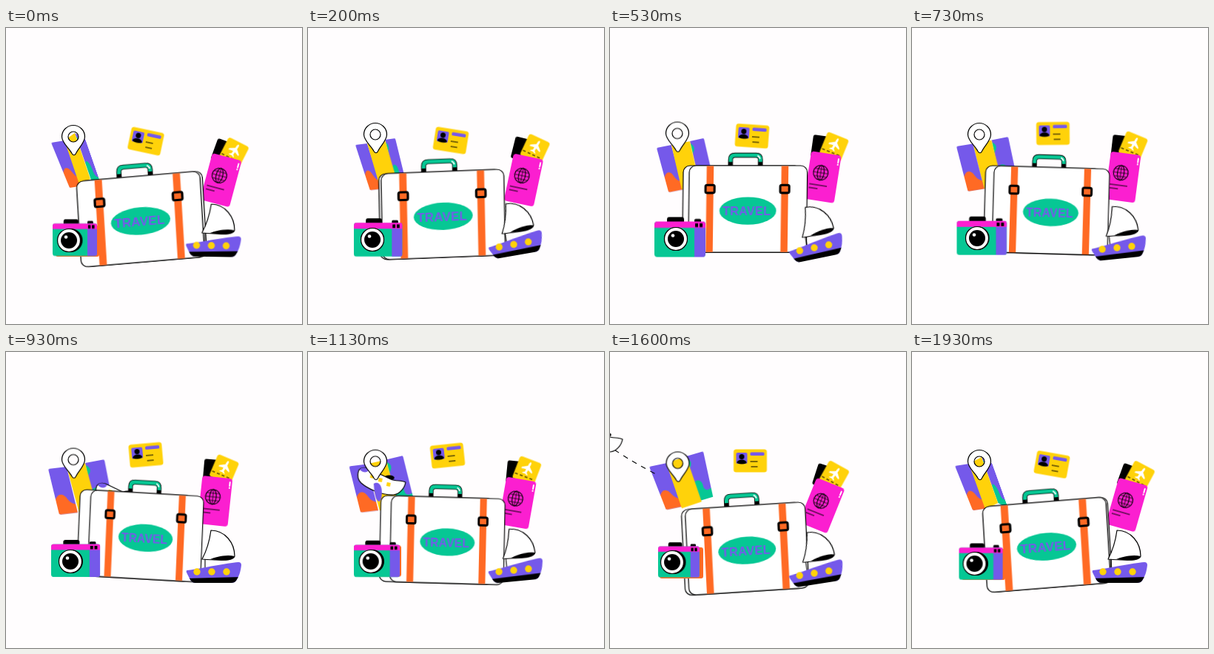
Write an HTML page without scripts that moves like this. It is 400 by 400 pixels and loops after 2 s.

```html
<!DOCTYPE html>
<html lang="en">
<head>
<meta charset="utf-8">
<title>Travel</title>
<style>
html, body { margin: 0; width: 100%; height: 100%; overflow: hidden; background: #fffdfe; }
svg { display: block; width: 100%; height: 100%; }
.m { animation: 2s linear infinite; }
.ink { fill: #fff; stroke: #000; stroke-width: 1.2; stroke-linejoin: round; }
.line { fill: none; stroke: #000; stroke-width: 1.1; }
.or { fill: #ff6a24; } .gr { fill: #06c794; } .pk { fill: #fb1fd0; }
.ye { fill: #ffd20a; } .pu { fill: #7559ea; } .wh { fill: #fff; }
text { font: bold 16px "Liberation Sans", Arial, sans-serif; letter-spacing: .3px; }

.case { animation-name: case; }
@keyframes case {
  0%, 100% { transform: matrix(1.055,-.09,.06,1,124.5,205); }
  10% { transform: matrix(1.05,-.04,.02,1,128,196); }
  26.5% { transform: matrix(1.01,0,-.013,1.01,135.5,186); }
  46.5% { transform: matrix(.965,.055,-.043,1,142,188); }
  66.5% { transform: matrix(.98,0,0,1,138,202); }
  80% { transform: matrix(1.025,-.065,.05,1,130,211); }
  96.5% { transform: matrix(1.055,-.085,.06,1,124.5,207); }
}
.back { animation-name: back; }
@keyframes back {
  0%, 100% { transform: translate(3px); }
  10% { transform: translate(-3px); }
  26.5% { transform: translate(-8px); }
  46.5% { transform: translate(-15px); }
  66.5% { transform: translate(-14px); }
  80% { transform: translate(-5px); }
  96.5% { transform: translate(2px); }
}
.map1 { animation-name: map1; }
@keyframes map1 {
  0%, 100% { transform: matrix(.75,-.125,.417,1.017,61,155); }
  10% { transform: matrix(.67,-.08,.33,1.02,64,158); }
  26.5% { transform: matrix(.83,-.17,.27,1,63,162); }
  46.5% { transform: matrix(1.04,-.12,.25,1.03,57,158); }
  66.5% { transform: matrix(.96,-.12,.27,1.05,54,151); }
  80% { transform: matrix(.96,-.2,.38,.97,53,155); }
  96.5% { transform: matrix(.79,-.12,.4,1,58,154); }
}
.map2 { animation-name: map2; }
@keyframes map2 {
  0%, 100% { transform: matrix(.58,-.42,.35,1.03,79,152); }
  10% { transform: matrix(1,-.2,.3,1.02,80,156); }
  26.5% { transform: matrix(1.04,-.2,.23,1,83,158); }
  46.5% { transform: matrix(1.04,-.2,.28,1.03,82,155); }
  66.5% { transform: matrix(1.12,-.29,.3,1.07,77,148); }
  80% { transform: matrix(1.12,-.37,.35,1.02,76,150); }
  96.5% { transform: matrix(.71,-.37,.37,1.03,77,151); }
}
.map3 { animation-name: map3; }
@keyframes map3 {
  0%, 100% { transform: matrix(.58,.33,.37,1.07,93,142); }
  10% { transform: matrix(.58,-.08,.25,1.02,104,151); }
  26.5% { transform: matrix(.79,-.17,.23,1,108,153); }
  46.5% { transform: matrix(1.08,-.2,.2,1.03,107,150); }
  66.5% { transform: matrix(.83,-.25,.32,1.07,104,141); }
  80% { transform: matrix(.96,-.29,.22,1.03,103,141); }
  96.5% { transform: matrix(.58,.33,.37,1.03,94,142); }
}
.pin { animation-name: pin; }
@keyframes pin {
  0%, 100% { transform: translate(91px,147px); }
  10% { transform: translate(91px,144px); }
  26.5% { transform: translate(91px,142.5px); }
  46.5% { transform: translate(91px,145.5px); }
  66.5% { transform: translate(91px,150px); }
  80% { transform: translate(91.5px,150.5px); }
  96.5% { transform: translate(91px,148px); }
}
.card { animation-name: card; }
@keyframes card {
  0%, 100% { transform: translate(189px,153px) rotate(12deg); }
  10% { transform: translate(193px,152px) rotate(9deg); }
  26.5% { transform: translate(192px,146px) rotate(4deg); }
  46.5% { transform: translate(189px,139px) rotate(-5deg); }
  66.5% { transform: translate(188px,141px) rotate(-7deg); }
  80% { transform: translate(189.5px,147px) rotate(0deg); }
  96.5% { transform: translate(189px,152px) rotate(10deg); }
}
.pass { animation-name: pass; }
@keyframes pass {
  0%, 100% { transform: translate(290px,205px) rotate(15deg); }
  10% { transform: translate(291px,205px) rotate(12deg); }
  26.5% { transform: translate(287px,201px) rotate(9deg); }
  46.5% { transform: translate(282px,201px) rotate(6deg); }
  66.5% { transform: translate(283px,206px) rotate(14deg); }
  80% { transform: translate(286px,207px) rotate(22deg); }
  96.5% { transform: translate(290px,206px) rotate(16deg); }
}
.ticket { animation-name: ticket; }
@keyframes ticket {
  0%, 100% { transform: translate(308px,168px) rotate(27deg); }
  10% { transform: translate(307px,163px) rotate(25deg); }
  26.5% { transform: translate(303px,160px) rotate(22deg); }
  46.5% { transform: translate(295px,158px) rotate(23deg); }
  66.5% { transform: translate(297px,162px) rotate(19deg); }
  80% { transform: translate(303px,167px) rotate(29deg); }
  96.5% { transform: translate(308px,167px) rotate(28deg); }
}
.stub { animation-name: stub; }
@keyframes stub {
  0%, 100% { transform: translate(290px,166px) rotate(20deg); }
  10% { transform: translate(286px,163px) rotate(14deg); }
  26.5% { transform: translate(282px,160px) rotate(8deg); }
  46.5% { transform: translate(276px,160px) rotate(5deg); }
  66.5% { transform: translate(279px,164px) rotate(6deg); }
  80% { transform: translate(286px,167px) rotate(18deg); }
  96.5% { transform: translate(290px,167px) rotate(20deg); }
}
.boat { animation-name: boat; }
@keyframes boat {
  0%, 100% { transform: translate(277.5px,294px) rotate(1deg); }
  10% { transform: translate(278px,292.5px) rotate(-10deg); }
  26.5% { transform: translate(276px,297px) rotate(-11.5deg); }
  46.5% { transform: translate(278px,297px) rotate(0deg); }
  66.5% { transform: translate(278px,293px) rotate(-11deg); }
  80% { transform: translate(276px,299px) rotate(-9deg); }
  96.5% { transform: translate(278px,297px) rotate(0deg); }
}
.body { animation-name: body; }
@keyframes body {
  0%, 100% { transform: translate(63px,264px) scale(.87,.92); }
  10% { transform: translate(62px,263px) scale(.95,.96); }
  26.5% { transform: translate(60px,261.5px) scale(1); }
  46.5% { transform: translate(61px,259.5px) scale(.96,.93); }
  66.5% { transform: translate(63px,261px) scale(.84,.9); }
  80% { transform: translate(65px,262.5px) scale(.81,.88); }
  96.5% { transform: translate(63.5px,264px) scale(.86,.91); }
}
.side { animation-name: side; }
@keyframes side {
  0%, 100% { transform: translateY(267px); }
  10% { transform: translateY(265px); }
  26.5% { transform: translateY(264px); }
  46.5% { transform: translateY(261px); }
  66.5% { transform: translateY(262px); }
  80% { transform: translateY(264px); }
  96.5% { transform: translateY(266px); }
}
.lens { animation-name: lens; }
@keyframes lens {
  0%, 100% { transform: translate(85px,287px); }
  10% { transform: translate(87px,286px); }
  26.5% { transform: translate(89px,285px); }
  46.5% { transform: translate(87px,283px); }
  66.5% { transform: translate(82.5px,283px); }
  80% { transform: translate(84px,284px); }
  96.5% { transform: translate(84.5px,286px); }
}
.tube { animation-name: tube; }
@keyframes tube {
  0%, 80%, 96.5%, 100% { transform: translate(2.5px); }
  10%, 26.5% { transform: translate(0); }
  46.5% { transform: translate(1px); }
  66.5% { transform: translate(3.5px); }
}
.plane { animation-name: plane; }
@keyframes plane {
  0%, 38% { transform: translate(140px,72px); }
  46.5% { transform: translate(108px,42px); }
  66.5% { transform: translate(0,0); }
  80% { transform: translate(-61px,-37px); }
  87%, 100% { transform: translate(-100px,-62px); }
}
.gate { animation-name: gate; }
@keyframes gate {
  0%, 46.5% { transform: translate(186px); }
  66.5% { transform: translate(72px); }
  80% { transform: translate(-18px); }
  93.5%, 100% { transform: translate(-95px); }
}
</style>
</head>
<body>
<svg viewBox="0 0 400 400">
  <defs>
    <clipPath id="gate"><rect class="m gate" y="100" width="80" height="120"/></clipPath>
    <clipPath id="cam"><rect width="69" height="48" rx="4"/></clipPath>
    <clipPath id="hull"><path id="hullShape" d="M-33-2C-10-5 20-12 36-13Q40-13 40-9C39 0 37 6 33 12Q31 15 26 15H-22Q-27 15-30 9L-34 1Q-35-2-33-2Z"/></clipPath>
    <rect id="shell" x="-28" width="158" height="116" rx="9"/>
    <g id="strap">
      <path class="or" d="M-4.7 .5h9.4v115h-9.4z"/>
      <rect class="or" x="-6" y="26" width="12" height="10.5" rx="2" stroke="#000" stroke-width="3"/>
    </g>
  </defs>

  <!-- map -->
  <g class="m map3">
    <path class="pu" d="M0 0H22Q24 0 24 2V60H0Z"/>
    <path class="gr" d="M0 38C6 30 14 34 14 42S20 50 24 48V60H0ZM0 3Q9 9 0 17Z"/>
  </g>
  <g class="m map1">
    <path class="pu" d="M2 0H24V60H2Q0 60 0 58V2Q0 0 2 0Z"/>
    <path class="or" d="M0 40C4 33 11 33 14 39S18 47 24 49V60H2Q0 60 0 58Z"/>
  </g>
  <path class="m map2 ye" d="M0 0H24V60H0Z"/>
  <path class="line" d="M150 204C110 186 85 177 62 165S20 142-6 124" stroke-dasharray="7 7" clip-path="url(#gate)"/>
  <g class="m plane">
    <ellipse cx="56" cy="149" rx="7" ry="3.5"/>
    <path class="ink" d="M14 142C15 134 24 134 31 138L58 151C65 154 72 152 78 155C77 163 70 171 62 172C45 173 26 163 18 156C14 152 13 147 14 142Z"/>
    <path class="pu" d="M16 138C19 134 25 135 29 138Q24 145 16 138ZM35 157C42 153 46 160 46 168C46 175 45 181 42 181C38 180 37 172 36 168Z"/>
    <path class="ye" d="M31 144l5 1-1 5-5-1zM42 149l5 1-1 5-5-1zM53 155l5 1-1 5-5-1z"/>
  </g>
  <path class="m pin ink" fill-rule="evenodd" d="M0-15.5A15.5 15.5 0 0 1 15.5 0C15.5 8 7 15 3.5 22.500Q1 27-2 22.500C-6 15-15.500 8-15.500 0A15.5 15.5 0 0 1 0-15.5ZM0-7A7 7 0 0 0 0 7A7 7 0 0 0 0-7Z"/>

  <!-- identity card -->
  <g class="m card">
    <rect class="ye" x="-22.500" y="-15.500" width="45" height="31" rx="3.500"/>
    <rect class="pu" x="-19" y="-11" width="15" height="15" rx="2"/>
    <circle cx="-11.500" cy="-5.500" r="3.500"/>
    <path d="M-18 3C-18-3-5-3-5 3Q-11 6-18 3Z"/>
    <rect class="pu" x="0" y="-11.500" width="19" height="4.500" rx="1.500"/>
    <path class="line" d="M0 1H10M1 8H10"/>
  </g>

  <!-- passport and tickets -->
  <rect class="m stub" x="-9" y="-15" width="20" height="30" rx="3"/>
  <g class="m ticket">
    <rect class="ye" x="-15.500" y="-15.500" width="31" height="32" rx="3.500"/>
    <path class="line" d="M-14 9H14" stroke-dasharray="4 3"/>
    <path class="wh" transform="translate(0 -3) rotate(8)" d="M0-9Q1.500-9 1.500-6V-3L8 2V4L1.500 2V6L4 8V9L0 8L-4 9V8L-1.500 6V2L-8 4V2L-1.500-3V-6Q-1.500-9 0-9Z"/>
  </g>
  <g class="m pass">
    <rect class="pk" x="-20" y="-32" width="41" height="65" rx="4"/>
    <g class="line" transform="translate(-3 -5)">
      <circle r="10"/><ellipse rx="4.500" ry="10"/>
      <path d="M0-10V10M-10 0H10M-8.500-5H8.500M-8.500 5H8.500" stroke-width=".8"/>
    </g>
    <path class="line" d="M-16 12H8M-16 17H-4"/>
    <path d="M18-27V-22M18-19.500V-19" stroke="#fff" stroke-width="2" stroke-linecap="round"/>
  </g>

  <!-- suitcase -->
  <g class="m case">
    <g fill="none">
      <path d="M27 1V-8Q27-14 33-14H61Q67-14 67-8V1" stroke="#000" stroke-width="6.500"/>
      <path d="M27-5V-8Q27-14 33-14H61Q67-14 67-8V-5" stroke="#06c794" stroke-width="4.800"/>
      <path d="M63-13.500Q66-12 66.500-9" stroke="#fff" stroke-width="1.800"/>
    </g>
    <g class="m back"><use href="#shell" class="ink"/></g>
    <use href="#shell" class="ink"/>
    <use href="#strap"/>
    <use href="#strap" x="100"/>
    <ellipse class="gr" cx="51" cy="60.500" rx="38" ry="18.500"/>
    <text class="pu" x="49.500" y="66.500" text-anchor="middle">TRAVEL</text>
  </g>

  <!-- boat -->
  <g class="m boat">
    <path class="line" d="M-9-18V-5"/>
    <path class="ink" d="M-1-56C18-56 31-39 31-21C30-14 0-16-13-17Q-4-34-1-56Z"/>
    <path d="M31-21C20-24 5-20-2-17C12-15 29-13 31-21Z"/>
    <use href="#hullShape" class="pu"/>
    <path clip-path="url(#hull)" d="M-36 9L42 7V18H-36Z"/>
    <g class="ye"><circle cx="-20" r="4.700"/><circle r="4.700"/><circle cx="20" r="4.700"/></g>
  </g>

  <!-- camera -->
  <rect class="m side or" x="67" width="59" height="42" rx="3"/>
  <g class="m body">
    <path d="M17 1V-3Q17-6 20-6H37Q40-6 40-3V1ZM54 1V-2Q54-3.500 56-3.500H61Q63-3.500 63-2V1Z"/>
    <g clip-path="url(#cam)">
      <path class="gr" d="M0 0H69V48H0Z"/>
      <path class="pu" d="M54 0H69V48H54Z"/>
      <path class="pk" d="M0 0H69V8.500H0Z"/>
    </g>
    <path d="M55 2.500h4v5h-4zM61 2.500h4v5h-4z"/>
  </g>
  <g class="m lens">
    <circle class="m tube" r="16"/>
    <circle class="ink" r="15.500"/>
    <circle r="11"/>
    <circle class="wh" cx="-4" cy="-4.500" r="2.300"/>
  </g>
</svg>
</body>
</html>
```
